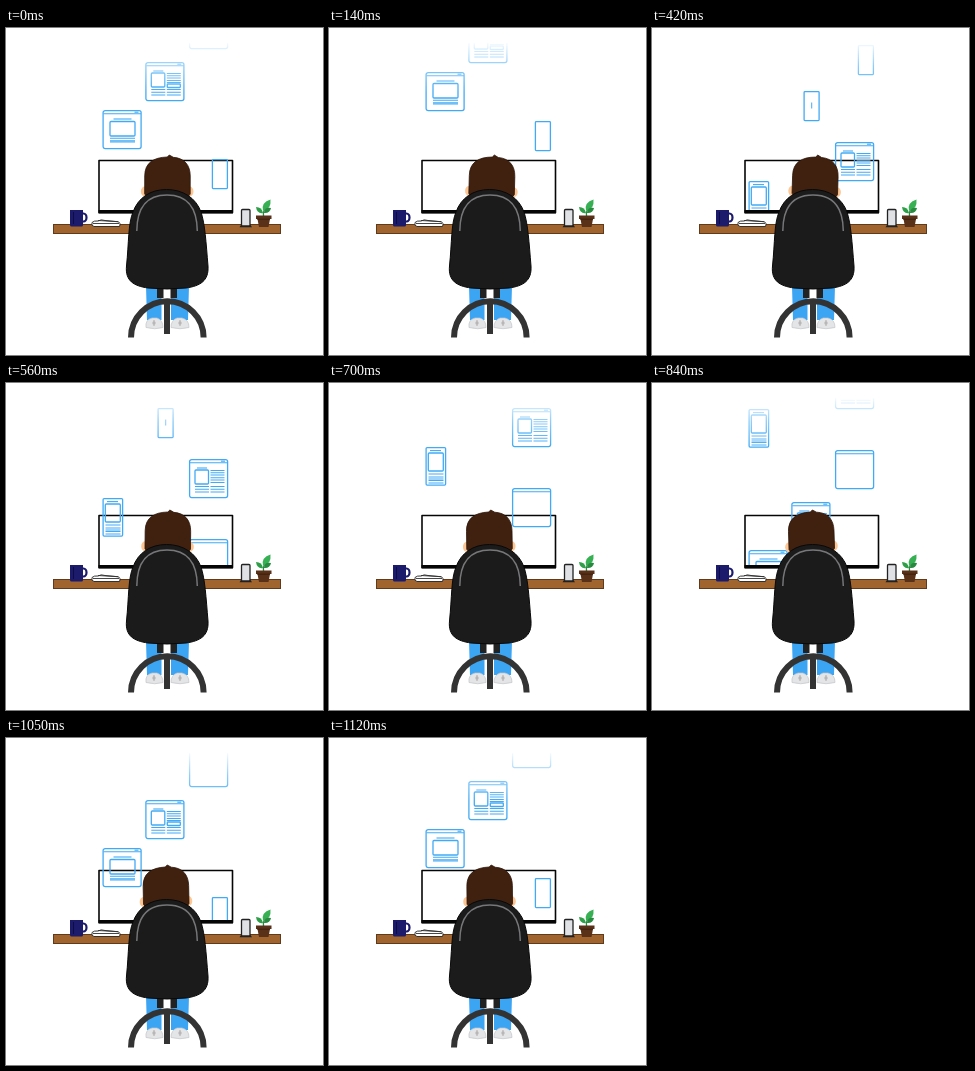
Write an HTML page that moves like this. It is 317 px wide and 327 px high and loops after 1.19 s.

```html
<!DOCTYPE html>
<html lang="en">
<head>
<meta charset="utf-8">
<title>At the desk</title>
<style>
html, body { margin: 0; width: 100%; height: 100%; overflow: hidden; background: #fff }
svg { display: block }
</style>
</head>
<body>
<svg width="317" height="327" viewBox="0 0 317 327" fill="none">
  <defs>
    <linearGradient id="rise" gradientUnits="userSpaceOnUse" x1="0" y1="13" x2="0" y2="64">
      <stop offset="0" stop-color="#000"/>
      <stop offset=".5" stop-color="#999"/>
      <stop offset="1" stop-color="#fff"/>
    </linearGradient>
    <mask id="fade" maskUnits="userSpaceOnUse" x="90" y="15" width="140" height="167">
      <rect x="90" y="15" width="140" height="167" fill="url(#rise)"/>
    </mask>
  </defs>

  <!-- desk -->
  <rect x="47.5" y="196.5" width="227" height="9" fill="#a0642f" stroke="#61391b"/>

  <!-- monitor -->
  <rect x="93" y="132.5" width="133.5" height="52" fill="#fff" stroke="#050505" stroke-width="1.6" stroke-linejoin="round"/>
  <path d="M92.5 183.8H227" stroke="#050505" stroke-width="3.6"/>

  <!-- mug -->
  <path d="M76 185.5h1.5a3 4 0 0 1 0 8H76" stroke="#1b1a6b" stroke-width="2.2"/>
  <path d="M64 182h13v15q0 1.5-1.5 1.5h-10q-1.5 0-1.5-1.5z" fill="#1b1a6b"/>
  <path d="M67.5 184v12" stroke="#0d0c43"/>

  <!-- papers -->
  <path d="M86 194.5q2-2 6-1.5q3-2 7-.5l13 1.2q3 1 1.5 4.800H88q-3-.5-2-4z" fill="#fff" stroke="#222" stroke-width=".9"/>
  <path d="M87 195.500H113M92 192.500l20 1.200" stroke="#333" stroke-width=".9"/>

  <!-- phone on its stand -->
  <path d="M233.500 199.300h12.500l-1.500-2.300h-9.500z" fill="#222"/>
  <rect x="235.500" y="181.500" width="8.500" height="16.500" rx="1" fill="#dfe1e5" stroke="#222" stroke-width="1.300"/>

  <!-- plant -->
  <path d="M257.500 188q-1-6 4-10" stroke="#278a3e" stroke-width="1.300"/>
  <path d="M257 185q-6 1-7-6q6 0 7 6z" fill="#2f9e48"/>
  <path d="M257 182.500q-2-8 7.500-11q1 10-7.500 11z" fill="#36b052"/>
  <path d="M258 185q0-6 7-5q-1 5.500-7 5z" fill="#278a3e"/>
  <path d="M250 187.500h15.500v3.500h-1.500l-1.500 8h-9.500l-1.500-8H250z" fill="#593018"/>
  <path d="M251 191.200h13" stroke="#34190a" stroke-width=".8"/>

  <g mask="url(#fade)" id="cards" stroke="#42aaf5" stroke-width="1.300"></g>

  <g id="head">
    <ellipse cx="138.500" cy="163.500" rx="3.800" ry="5" fill="#fcc695"/>
    <ellipse cx="183.500" cy="163.500" rx="3.800" ry="5" fill="#fcc695"/>
    <path d="M138.500 166V148C138.500 135 147 129.500 161 129L163 127L167 129.300C178 130 184 137 184 148V166L176 176H147z" fill="#40210f" stroke="#2c1508" stroke-width=".8"/>
  </g>

  <!-- legs and shoes -->
  <path d="M140 258h15.500v34H141zM165 258h18l-1 34h-17z" fill="#3ba4f3"/>
  <path d="M140 299.500q-1-8 6-9.500h5q6 2 6 9.500q-8 2.500-17 0zM165 299.500q0-7.500 6-9.500h5q7 1.500 7 9.500q-9 2.500-18 0z" fill="#e4e5e7" stroke="#c3c5c9" stroke-width=".7"/>
  <path d="M148 292v6M174 292v6" stroke="#b5a9a9"/>
  <circle cx="148" cy="295" r="1.700" fill="#b9b6b8"/>
  <circle cx="174" cy="295" r="1.700" fill="#b9b6b8"/>

  <!-- chair -->
  <path d="M151 258h20v12h-20z" fill="#222"/>
  <path d="M157.500 261h7v9h-7z" fill="#fff"/>
  <path d="M125 309.500a36.300 36.300 0 0 1 72.600 0M161 271V306" stroke="#333" stroke-width="6"/>
  <path d="M160.500 161.500C177 161.500 190 170 195 184C199 196 200 214 202 238C203 253 194 258 180 260Q161 262 142 260C128 258 119 253 120.500 238C123 214 122 196 127 184C132 170 144 161.500 160.500 161.500z" fill="#1b1b1b" stroke="#080808"/>
  <path d="M130.800 203C131 178 142 167 161 167S191 178 191.300 203" stroke="#77777a" stroke-width="1.500"/>
</svg>
<script>
const STEP = 70, STEPS = 17, RISE = 19, JUMP = 13, TRACK = 326;
const $ = id => document.getElementById(id);

const box = (x, y, w, h, r = 1) => `<rect x="${x}" y="${y}" width="${w}" height="${h}" rx="${r}"/>`;
const lines = (x, w, ys) => `<path stroke-width="1.1" d="${ys.map(y => `M${x} ${y}h${w}`).join('')}"/>`;

const frame = box(.6, .6, 38, 38, 2) + lines(1, 37.500, [3.700]);
const bar = frame + lines(32, 4, [2.200]);
const page = bar + lines(8, 10, [9]) + box(6, 11, 13.500, 14) + lines(6, 14, [27.500, 30.300, 33]) +
  lines(21.500, 14, [27.500, 30.300, 33]);
const article = page + lines(21.500, 14, [11.500, 13.700, 16, 18.800, 21, 23.500]);
const news = page + lines(21.500, 14, [11.500, 13.700, 16, 18.500, 20.500]) + box(22, 22, 13, 3.500, .5);
const hero = bar + lines(11, 18, [9]) + box(7.500, 11.500, 25, 14.500) +
  lines(7.500, 25, [28.300, 30.800, 32]);
const reader = box(.6, .6, 19.500, 37.500) + lines(4.500, 11, [3.600]) + box(2.800, 6, 15, 18) +
  lines(3, 15, [27, 30, 32, 33.500, 36]);
const phone = box(.6, .6, 15, 29, .8);
const note = phone + lines(7.700, 1, [12, 13, 14, 15, 16, 17]);

// column x, height at the start of the loop, drawing
const cards = [
  [96.500, 82, hero], [139.300, 34, news], [205.800, 131, phone], [151.500, 177, note],
  [96.500, 267, reader], [183, 228, article], [183, 308, frame]
].map(([x, y, art]) => {
  const node = document.createElementNS('http://www.w3.org/2000/svg', 'g');
  node.innerHTML = art;
  $('cards').append(node);
  return { x, y, node };
});

function draw(now) {
  const k = Math.floor(now / STEP) % STEPS;
  const climb = k * RISE + (k > 8 ? JUMP : 0);
  for (const { x, y, node } of cards) {
    const top = (y - climb + 40 + 2 * TRACK) % TRACK - 40;
    node.setAttribute('transform', `translate(${x} ${top})`);
  }
  const tilt = .2 + 2 * Math.sin(2 * Math.PI * k / STEPS);
  $('head').setAttribute('transform', `rotate(${tilt} 161 215)`);
  requestAnimationFrame(() => draw(performance.now() - start));
}
const start = performance.now();
draw(0);
</script>
</body>
</html>
```
